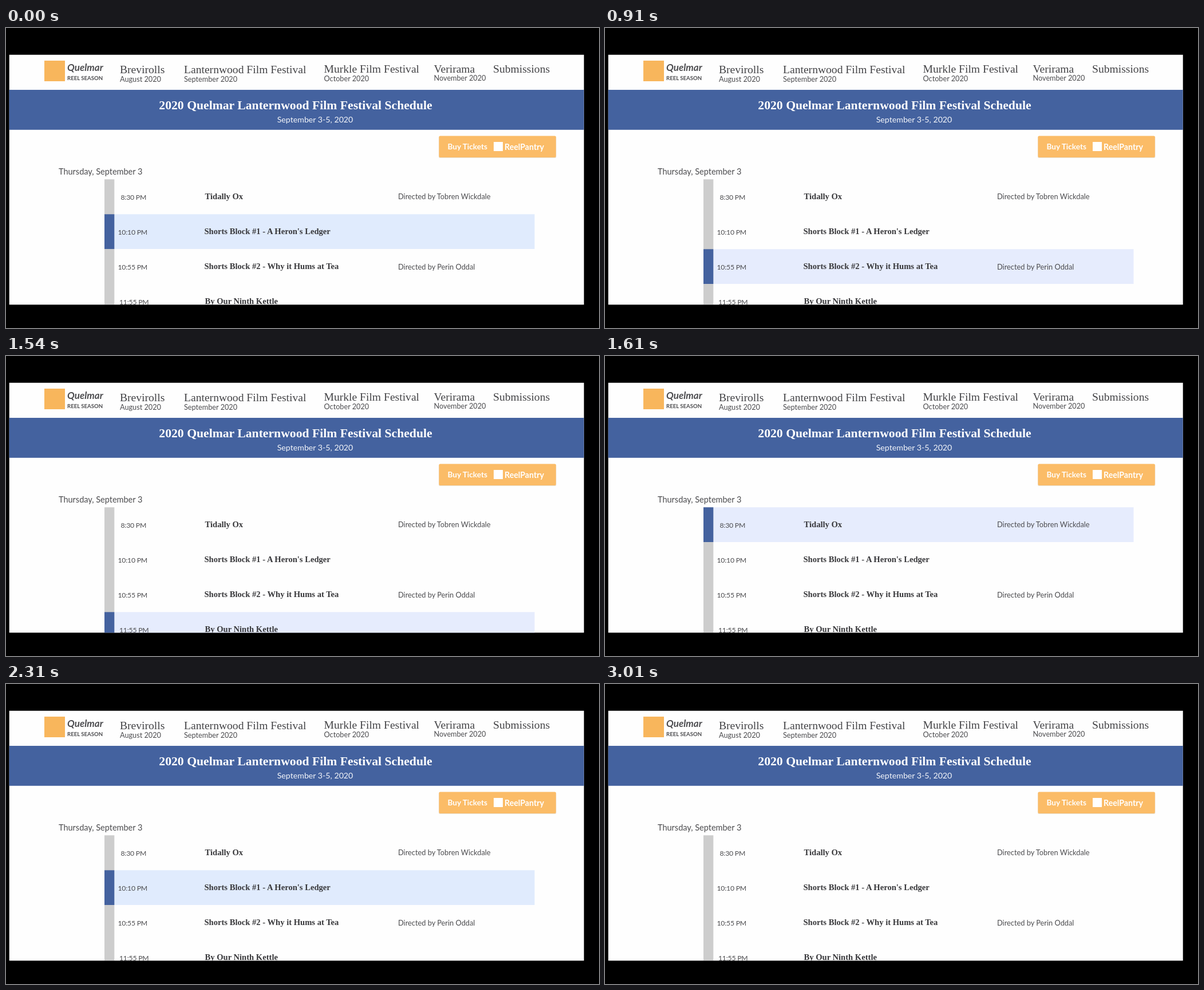
Recreate the animation shown at these times as an HTML page. Size 1036 by 524 pixels, loop 3080 ms.

```html
<!DOCTYPE html>
<html lang="en">
<head>
<meta charset="utf-8">
<title>Festival schedule</title>
<style>
  html, body { margin: 0; width: 100%; height: 100%; overflow: hidden; background: #000; }
  svg { display: block; width: 100vw; height: 100vh; }
  text { font-family: Lato, "Open Sans", sans-serif; fill: #4c4c4f; white-space: pre; }
  .nav { font: 19.6px "Liberation Serif", serif; fill: #444447; }
  .sub { font-size: 12.7px; }
  .head { font: bold 21.7px "Liberation Serif", serif; fill: #fff; }
  .date { font-size: 14.2px; fill: #f4f6fa; }
  .day { font-size: 14.5px; }
  .time { font-size: 12.2px; letter-spacing: -.2px; }
  .film { font: bold 14.6px "Liberation Serif", serif; fill: #38383b; }
  .by { font-size: 12.8px; }
  .buy { font-size: 13.6px; font-weight: bold; fill: #fff; }
  .shop { font-size: 14.2px; font-weight: bold; fill: #fff; }
  .name { font-size: 17px; font-weight: bold; font-style: italic; }
  .kind { font-size: 9.6px; font-weight: bold; }
</style>
</head>
<body>
<svg id="stage" viewBox="0 0 1036 524" preserveAspectRatio="none">
  <clipPath id="page"><rect x="5.7" y="46.8" width="1004" height="436.4"/></clipPath>
</svg>
<script>
const NS = 'http://www.w3.org/2000/svg';
const LOOP = 3080, TICK = 70;
const stage = document.getElementById('stage');

function add(parent, tag, attrs, content) {
  const el = document.createElementNS(NS, tag);
  for (const key in attrs) el.setAttribute(key, attrs[key]);
  if (content) el.textContent = content;
  return parent.appendChild(el);
}

const page = add(stage, 'g', { 'clip-path': 'url(#page)' });
const box = (x, y, width, height, fill, rx = 0) =>
  add(page, 'rect', { x, y, width, height, fill, rx });
const label = (cls, x, y, str, anchor = 'start') =>
  add(page, 'text', { class: cls, x, y, 'text-anchor': anchor }, str);

box(5, 46, 1006, 438, '#fefefe');

// Header
box(67, 57, 36, 36, '#f8b65c');
label('name', 107, 75, 'Quelmar');
label('kind', 107, 91, 'REEL SEASON');
const nav = [
  [199, 79, 'Brevirolls', 'August 2020'],
  [311, 79, 'Lanternwood Film Festival', 'September 2020'],
  [555.5, 78, 'Murkle Film Festival', 'October 2020'],
  [747.5, 78, 'Verirama', 'November 2020'],
  [851, 78, 'Submissions', '']
];
for (const [x, y, name, month] of nav) {
  label('nav', x, y, name);
  if (month) label('sub', x, y + (x > 700 ? 13.5 : 14.5), month);
}

// Title band
box(5, 108, 1006, 69.8, '#44629f');
label('head', 506, 142, '2020 Quelmar Lanternwood Film Festival Schedule', 'middle');
label('date', 540, 165, 'September 3-5, 2020', 'middle');

// Ticket button
box(756, 189, 205.3, 38, '#e9dfd0', 2);
box(756.5, 188.5, 204.3, 37.5, '#fbbc67', 2);
label('buy', 771.5, 211.5, 'Buy Tickets');
box(852, 199, 16, 16, '#fff');
label('shop', 871, 213, 'ReelPantry');

// Schedule
label('day', 92, 256, 'Thursday, September 3');
box(172, 264.3, 17.3, 219, '#cdcdcd');
const rows = [
  [200.5, '8:30 PM', 347.5, 'Tidally Ox', 'Directed by Tobren Wickdale'],
  [195.5, '10:10 PM', 346.5, "Shorts Block #1 - A Heron's Ledger", ''],
  [195.5, '10:55 PM', 346.5, 'Shorts Block #2 - Why it Hums at Tea', 'Directed by Perin Oddal'],
  [198, '11:55 PM', 347.5, 'By Our Ninth Kettle', '']
];
const marks = rows.map(([tx, time, fx, film, by], i) => {
  const y = 264.3 + i * 61;
  const mark = add(page, 'g', { visibility: 'hidden' });
  const fill = i === 1 ? '#e0ebfd' : '#e6ecfd';
  add(mark, 'rect', { x: 189.3, y, width: 734.2, height: 60.7, fill });
  add(mark, 'rect', { x: 172, y, width: 17.3, height: 60.7, fill: '#44629f' });
  label('time', tx, y + 36, time);
  label('film', fx, y + 35, film);
  if (by) label('by', 685, y + (i ? 36 : 35), by);
  return mark;
});

// Hovered row from each moment on; -1 is none
const hover = [[0, 1], [140, 2], [1120, 3], [1610, 0], [1960, 1], [2660, -1]];

function draw(ms) {
  const t = Math.floor((ms % LOOP) / TICK + 1e-6) * TICK;
  let row = -1;
  for (const [at, i] of hover) if (t >= at) row = i;
  marks.forEach((m, i) => m.setAttribute('visibility', i === row ? 'visible' : 'hidden'));
}

const start = performance.now();
function loop(now) {
  draw(Math.max(0, now - start));
  requestAnimationFrame(loop);
}
draw(0);
requestAnimationFrame(loop);
</script>
</body>
</html>
```
